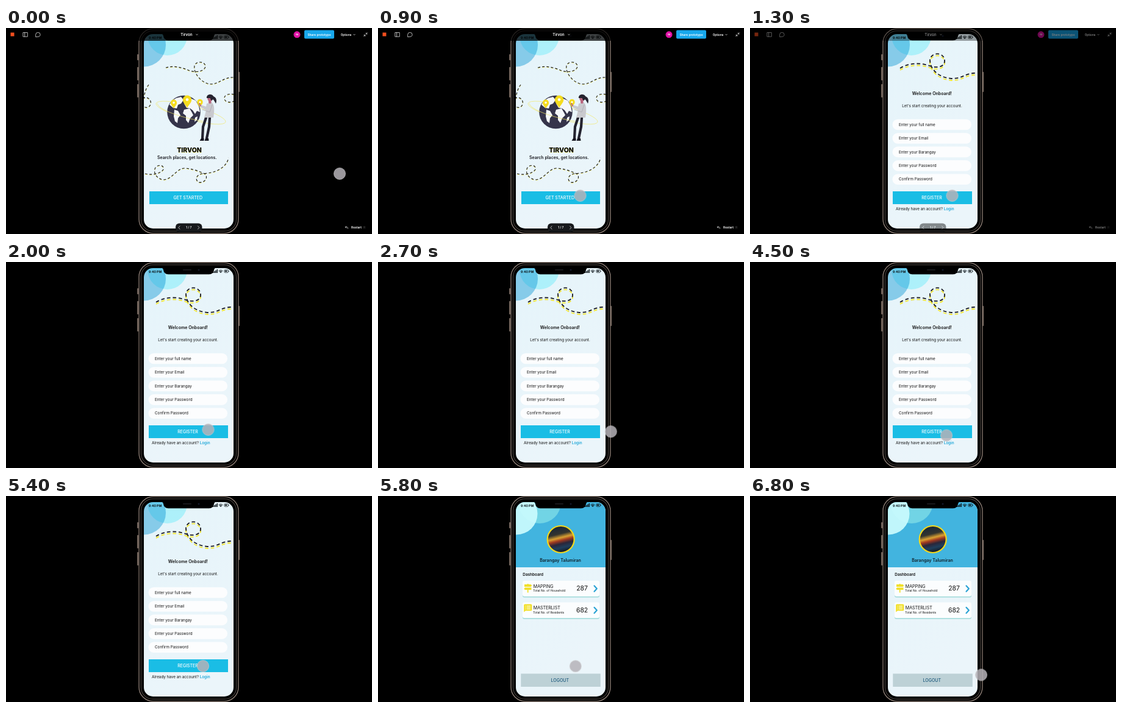
An HTML page that plays this animation: 600 by 338 pixels, repeating every 7 s.

```html
<!DOCTYPE html>
<html lang="en">
<head>
<meta charset="utf-8">
<title>App prototype</title>
<style>
  html, body { margin: 0; width: 100%; height: 100%; overflow: hidden; background: #000; }
  svg { display: block; width: 100%; height: 100%; font-family: Inter, Arial, sans-serif; }
  .mid { text-anchor: middle; }
  .body { font-size: 6.3px; fill: #111; }
  .cta { font-size: 7px; font-weight: 500; fill: #fff; text-anchor: middle; }
  .bold { font-weight: 600; }
  .line { fill: none; stroke-linecap: round; stroke-linejoin: round; }
  .trail { fill: none; stroke: #1b1b22; stroke-width: 1.15; stroke-dasharray: 4 3.2; filter: drop-shadow(.7px 1.3px 0 #f4f08a); }
  .trail.big { stroke-width: 1.8; stroke-dasharray: 5.6 4; filter: drop-shadow(.6px 3px 0 #f3e62c); }
  .tint { mix-blend-mode: multiply; }
  #ui { font-size: 4.9px; font-weight: 600; fill: #fff; }
  #ui .line { stroke: #ddd; stroke-width: .8; }
</style>
</head>
<body>
<svg viewBox="0 0 600 338">
  <defs>
    <clipPath id="screen"><rect x="226" y="10" width="147" height="319" rx="15"/></clipPath>
    <linearGradient id="sky" x2=".4" y2="1">
      <stop stop-color="#e5f4fa"/><stop offset="1" stop-color="#ebf5fa"/>
    </linearGradient>
    <linearGradient id="rim" x2="0" y2="1">
      <stop stop-color="#93837a"/><stop offset=".5" stop-color="#75675e"/><stop offset="1" stop-color="#93837a"/>
    </linearGradient>
    <linearGradient id="photo" x1=".3" x2=".55" y2="1">
      <stop offset=".08" stop-color="#1d2836"/><stop offset=".32" stop-color="#33342f"/>
      <stop offset=".46" stop-color="#d9a032"/><stop offset=".56" stop-color="#a23a20"/>
      <stop offset=".68" stop-color="#2b2639"/><stop offset=".82" stop-color="#1f3f5c"/>
      <stop offset="1" stop-color="#12141b"/>
    </linearGradient>
    <path id="pin" d="M0 0C-2-4-6-7-6-11A6 6 0 0 1 6-11C6-7 2-4 0 0Z"/>
  </defs>

  <!-- phone body -->
  <g fill="#75675e">
    <rect x="215" y="43" width="2.4" height="10" rx="1"/>
    <rect x="215" y="64" width="2.4" height="22" rx="1"/>
    <rect x="215" y="92" width="2.4" height="22" rx="1"/>
    <rect x="380.8" y="72" width="2.4" height="33" rx="1"/>
  </g>
  <rect x="218" y="1.2" width="163" height="335.6" rx="23" fill="#000" stroke="url(#rim)" stroke-width="1.3"/>
  <rect x="221.4" y="4.600" width="156.200" height="328.800" rx="19.500" fill="none" stroke="#443d39" stroke-width="1.2"/>

  <g clip-path="url(#screen)">
    <rect x="226" y="10" width="147" height="319" fill="url(#sky)"/>
    <circle cx="226" cy="27.500" r="36" fill="#86cbe9"/>
    <circle class="tint" cx="264.500" cy="12.500" r="32.500" fill="#c0fbff"/>

    <g id="welcome">
      <g class="trail">
        <path d="M262 65C276 61 289 65 301 70C314 74 327 70 327 62C325 54 311 54 309 62C307 73 318 87 330 91C347 96 354 80 374 81"/>
        <path d="M234 93C230 98 227 106 226 115C232 112 239 118 237 125C235 131 229 132 225 128"/>
        <path d="M374 109C365 107 357 110 358 116C359 122 367 123 374 120"/>
        <path d="M228 239C239 242 254 239 258 232C260 225 250 223 245 229C241 236 245 246 257 249C273 249 279 230 293 230C306 231 317 235 327 240C332 247 324 255 316 253C309 249 312 241 321 239C345 238 361 229 365 213"/>
      </g>
      <ellipse cx="303" cy="139" rx="59" ry="11.500" transform="rotate(15 303 139)" fill="none" stroke="#f1e978" stroke-width=".7"/>
      <circle cx="291.500" cy="138" r="27.300" fill="#35344a"/>
      <g fill="#f4f7fa">
        <path d="M268 126L271 120L279 115L287 113L291 118L287 124L282 126L280 132L274 131Z"/>
        <path d="M276 134L282 136L286 143L282 148L281 156L277 153L275 145Z"/>
        <path d="M292 124L298 120L304 116L311 119L316 128L318 138L313 136L310 141L306 135L302 132L296 131Z"/>
        <path d="M292 134L301 132L305 139L307 143L302 148L299 156L295 151L295 144L290 140Z"/>
        <path d="M310 147L314 145L313 151L309 154Z"/>
      </g>
      <path class="line" d="M248 124C250 134 286 147 323 153" stroke="#f1e465" stroke-width=".7"/>
      <g fill="#f5dc1e">
        <use href="#pin" transform="translate(275 132) scale(.85)"/>
        <use href="#pin" transform="translate(297 131) scale(1.2)"/>
        <use href="#pin" transform="translate(318 130) scale(.78)"/>
      </g>
      <g fill="#fff"><circle cx="275" cy="122.500" r="1.700"/><circle cx="297" cy="117.500" r="2.300"/><circle cx="318" cy="121.500" r="1.500"/></g>
      <!-- woman -->
      <path class="line" d="M328 147L323 162L322 181M334 147L333 162L329 181" stroke="#24232f" stroke-width="4.200"/>
      <path d="M317.500 185L320 181H324.500V185ZM325.500 185L327 181H332L332.500 185Z" fill="#16151f"/>
      <path d="M329 124L337 122C342 125 342 135 340 147H325L328 135L319 130V126L328 129Z" fill="#c9c9ce"/>
      <path class="line" d="M338 126L334 138L322 134" stroke="#adadb5" stroke-width=".9"/>
      <path class="line" d="M319 127.500L317 124" stroke="#b9677f" stroke-width="2"/>
      <rect x="332" y="117" width="4.500" height="7" rx="2" fill="#b9677f"/>
      <circle cx="334.500" cy="116" r="4.200" fill="#b9677f"/>
      <path d="M329 115C328 108 338 107 340 112C345 114 346 119 344 124C342 121 341 118 339 117C338 120 335 119 335 115Z" fill="#25232f"/>
      <text class="mid" x="300.500" y="203.500" font-size="10.500" font-weight="800" style="filter:drop-shadow(.3px 1.8px .4px #f4f08a)">TIRVON</text>
      <text class="mid bold" x="296.700" y="214.800" font-size="7" fill="#16161c">Search places, get locations.</text>
      <rect x="235" y="268" width="129" height="21" fill="#1abde5"/>
      <text class="cta" x="298.300" y="281">GET STARTED</text>
    </g>

    <g id="register">
      <path class="trail big" d="M246 66C258 58 278 56 294 62C308 67 320 63 319 53C318 39 297 39 295 52C295 68 309 81 330 83C350 83 352 74 370 74"/>
      <text class="mid bold" x="298.300" y="109.800" font-size="7" fill="#111">Welcome Onboard!</text>
      <text class="body mid" x="298.500" y="129.800">Let's start creating your account.</text>
      <g id="fields"></g>
      <rect x="234" y="268" width="130" height="21" fill="#1abde5"/>
      <text class="cta" x="298" y="281">REGISTER</text>
      <text class="body" x="239" y="299.300">Already have an account? <tspan class="bold" fill="#21a8d8">Login</tspan></text>
    </g>

    <g id="dashboard">
      <rect x="226" y="10" width="147" height="107" fill="#42b4df"/>
      <circle cx="265" cy="10" r="35" fill="#71d4e5"/>
      <circle cx="227" cy="29" r="34.500" fill="#c8fafd" opacity=".95"/>
      <circle cx="299.700" cy="71" r="22" fill="url(#photo)" stroke="#f4d81c" stroke-width="2.200"/>
      <text class="mid bold" x="299" y="107.600" font-size="7.050" fill="#10202a">Barangay Talumiran</text>
      <text x="237.300" y="130.700" font-size="6.400" class="bold" fill="#111">Dashboard</text>
      <g id="cards"></g>
      <g fill="#f1e02a">
        <path d="M244.800 144H246.600V145H250.500L252.300 147L250.500 149H240V145H244.800ZM241 150.300H251.500V154H241L239.200 152.200ZM244.800 154H246.600V158.500H244.800Z"/>
        <path d="M240.500 177.500H251Q252.300 177.500 252.300 179V187Q252.300 188.300 251 188.300H242L239.200 190.500V179Q239.200 177.500 240.500 177.500Z"/>
      </g>
      <path class="line" d="M242 180.600h.4m2 0h5.300M242 183h.4m2 0h5.300M242 185.400h.4m2 0h5.300" stroke="#fff" stroke-width=".9"/>
      <rect x="234.300" y="291.500" width="130.500" height="21.500" fill="#bdd1d6"/>
      <text class="cta" x="298.300" y="304.700" style="fill:#1b587c">LOGOUT</text>
    </g>

    <!-- status bar -->
    <text x="234" y="17.600" font-size="5.100" font-weight="700" fill="#0c1418">9:40 PM</text>
    <g fill="#0c1418">
      <path d="M339 18V16H340.500V18ZM341.200 18V14.800H342.700V18ZM343.400 18V13.400H344.900V18ZM345.600 18V12H347V18Z"/>
      <path d="M352 18L350.400 16.200Q352 15 353.600 16.200Z"/>
    </g>
    <path class="line" d="M348.800 14.300Q352 11.600 355.200 14.300M349.700 15.600Q352 13.600 354.300 15.600" stroke="#0c1418" stroke-width=".8"/>
    <rect x="358" y="12.900" width="6.200" height="4.400" rx="1" fill="none" stroke="#0c1418" stroke-width=".8"/>
    <path d="M359.200 14.100H362.200V16.100H359.200ZM364.700 14.300H365.500V15.900H364.700Z" fill="#0c1418"/>
  </g>

  <!-- notch -->
  <path d="M254 9H345Q341.500 10 341 13Q340 20.300 333 20.300H266Q259 20.300 258 13Q257.500 10 254 9Z" fill="#000"/>
  <rect x="290" y="12" width="14" height="1.800" rx=".9" fill="#1b1b1f"/>
  <circle cx="316" cy="13" r="1.500" fill="#14182a"/>

  <!-- viewer controls -->
  <g id="ui">
    <rect width="600" height="21" fill="#000" opacity=".74"/>
    <rect x="7.500" y="7.500" width="6" height="6" fill="#f24e1e"/>
    <path class="line" d="M28.300 7.500H35.300V14.200H28.300ZM30.700 7.500V14.200"/>
    <path class="line" d="M48.700 14.300V10.800A3.700 3.500 0 1 1 52.400 14.300Z"/>
    <text class="mid" x="296" y="13.300" font-size="6.200">Tirvon</text>
    <path class="line" d="M311.700 10.300L313 11.500L314.300 10.300"/>
    <circle cx="477" cy="10.800" r="5.500" fill="#e012a4"/>
    <text class="mid" x="477" y="12.300" font-size="4">va</text>
    <rect x="489" y="3.500" width="49" height="14" rx="2" fill="#18a8ec"/>
    <text class="mid" x="513.500" y="12.500">Share prototype</text>
    <text x="548.700" y="12.500" font-size="4.700">Options</text>
    <path class="line" d="M569.800 10.400L571 11.600L572.200 10.400"/>
    <path class="line" d="M592.500 7.700L590.300 9.900M590.300 8V9.900H592.200M586.500 13.700L588.700 11.500M588.700 13.400V11.500H586.800"/>
    <rect x="278" y="320.500" width="43.500" height="14.200" rx="6" fill="#17191c"/>
    <text class="mid" x="299.700" y="329.300">1 / 7</text>
    <path class="line" d="M285 325L282.800 327.500L285 330M314.600 325L316.800 327.500L314.600 330"/>
    <path class="line" d="M557.800 325.300L556.300 326.800L557.800 328.300M556.300 326.800H559.300Q560.700 327 560.500 329"/>
    <text x="566" y="329.200">Restart</text>
    <text x="586" y="329.200" fill="#555" font-weight="400">R</text>
  </g>

  <g id="pointer"><circle r="9.600" fill="#b5b1b7" fill-opacity=".85" stroke="#d2d2d2" stroke-opacity=".7" stroke-width=".8"/></g>
</svg>

<script>
  const LOOP = 7000;
  const $ = id => document.getElementById(id);

  $('fields').innerHTML = ['Enter your full name', 'Enter your Email', 'Enter your Barangay', 'Enter your Password', 'Confirm Password']
    .map((label, i) => {
      const y = 149.7 + i * 22.45;
      return `<rect x="233.5" y="${y}" width="129.5" height="17.6" rx="8.8" fill="#fcfdfe"/>
        <text class="body" x="244" y="${y + 10.9}">${label}</text>`;
    }).join('');

  $('cards').innerHTML = [['MAPPING', 'Household', 287, 139], ['MASTERLIST', 'Residents', 682, 174.5]]
    .map(([name, unit, count, y]) => `
      <rect x="237" y="${y + 1.4}" width="126" height="26" rx="3" fill="#a5dcdc"/>
      <rect x="237" y="${y}" width="126" height="25.8" rx="3" fill="#fbfdfe"/>
      <text x="254.8" y="${y + 11.8}" font-size="7.05" fill="#111">${name}</text>
      <text x="254.3" y="${y + 18.3}" font-size="4.9" fill="#111">Total No. of ${unit}</text>
      <text class="mid" x="334.6" y="${y + 16.2}" font-size="10.4" fill="#111">${count}</text>
      <path class="line" d="M354.5 ${y + 8.3}L358.8 ${y + 13}L354.5 ${y + 17.7}" stroke="#2ba3d4" stroke-width="2.2"/>`).join('');

  const play = (id, frames) => $(id).animate(frames, { duration: LOOP, iterations: Infinity });

  // Visible from one moment to another, with hard cuts.
  const show = (id, from, to) => play(id, [
    [0, +(from === 0)], [from, +(from === 0)], [from, 1], [to, 1], [to, +(to === LOOP)], [LOOP, +(to === LOOP)]
  ].map(([t, opacity]) => ({ offset: t / LOOP, opacity })));

  const SIGN_UP = 1150, SIGNED_IN = 5550;
  show('welcome', 0, SIGN_UP);
  show('register', SIGN_UP, SIGNED_IN);
  show('dashboard', SIGNED_IN, LOOP);
  play('ui', [[0, 1], [1200, 1], [1400, 0], [LOOP, 0]].map(([t, opacity]) => ({ offset: t / LOOP, opacity })));

  // time, x, y, easing to the next stop
  const stops = [
    [0, 547, 239], [100, 547, 239, 'ease-in-out'], [850, 331.5, 275],
    [2050, 331.5, 275, 'ease-in-out'], [2450, 450, 280, 'ease-in-out'],
    [2700, 382, 278.5], [3200, 277, 140], [3450, 281, 157, 'ease-in-out'],
    [3700, 301.5, 179.5], [4000, 306, 191, 'ease-in-out'],
    [4600, 323, 290, 'ease-in-out'], [4800, 323, 279],
    [5750, 323, 279, 'ease-in-out'], [6350, 379, 293.5], [LOOP, 379, 293.5]
  ];
  play('pointer', stops.map(([t, x, y, easing = 'linear']) =>
    ({ offset: t / LOOP, transform: `translate(${x}px, ${y}px)`, easing })));
</script>
</body>
</html>
```
